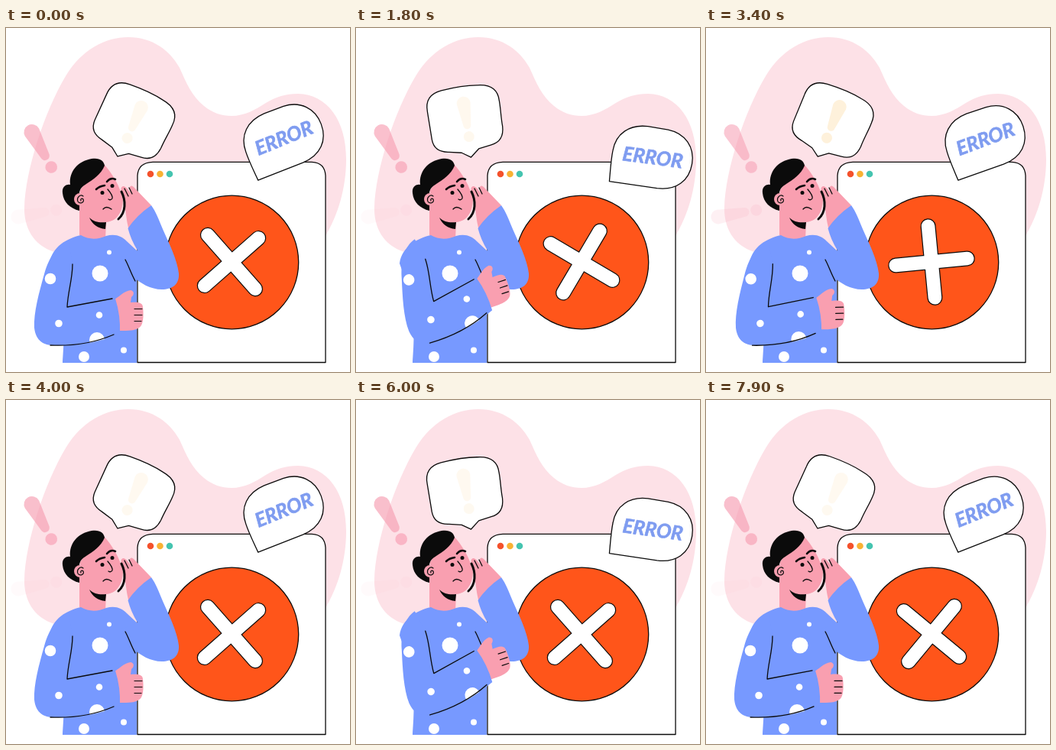
Recreate the animation shown at these times as an HTML page with a canvas. Size 450 by 450 pixels, loop 8000 ms.

```html
<!DOCTYPE html>
<html lang="en">
<head>
<meta charset="utf-8">
<title>Error</title>
<style>
html, body { margin: 0; width: 100%; height: 100%; overflow: hidden; background: #fff; }
canvas { display: block; width: 100vmin; height: 100vmin; margin: 0 auto; }
</style>
</head>
<body>
<canvas id="stage"></canvas>
<script>
const SIZE = 450;
const canvas = document.getElementById('stage');
const ctx = canvas.getContext('2d');
const ratio = Math.max(1, window.devicePixelRatio || 1);
canvas.width = canvas.height = SIZE * ratio;

const INK = '#0b0b0b', BLUE = '#7799ff', SKIN = '#f99fb0', BLUSH = '#fde1e7';
const ROSE = '#f7a0b4', AMBER = '#f9c46b', ORANGE = '#ff551a';

const shapes = Object.fromEntries(Object.entries({
  blob: 'M24 236C25 186 51 108 78 63C99 28 130 12 160 12C192 12 215 30 227 52C236 72 243 89 259 102C270 111 282 115 295 115C312 115 326 107 340 98C353 90 366 86 382 86C420 87 445 120 445 172C445 210 434 245 418 272L300 320H130C90 297 70 296 58 291C36 282 24 262 24 236Z',
  panel: 'M172 437.5V193Q173 176 192 175.3H400Q417 176 418 193V437.5Z',
  talk: 'M104 100C104 84 112 77 127 76C143 75 160 75 175 78C191 80 200 88 199 103C199 114 197 125 197 137C196 150 190 157 178 158L161 160L149 169L138 161L122 157C109 155 103 148 103 137Z',
  label: 'M331 200C330 186 328.5 172 329 160C329 137 345 122 369 121H396C419 122 434 138 434 160C434 183 419 198 394 199Z',
  torso: 'M74 438C75 420 78 390 72 350L57 308C60 286 80 275 98 271C108 277 120 277 131 272C143 269 151 272 158 279L172 292L171 330V438Z',
  sleeve: 'M159.5 262Q171 245 190 232C196 240 200 251 205 263C213 281 224 303 226 321C227 336 217 342 204 342C189 342 176 334 166 325L150 300L172 291C166 281 162 272 159.5 262Z',
  crease: 'M156 303C160 310 163 320 169 331',
  arm: 'M82 280C67 284 56 300 50 322C43 347 36 372 37 392C39 410 50 415 62 415C90 416 120 412 149 400Q150 376 143 354L80 365L87 309Z',
  armIn: 'M87 309C87 329 81 344 80 365Q112 359 139 354',
  armOut: 'M58 415Q104 417 141 401',
  hand: 'M139 357C148 352 154 344 163 343C168 344 168 349 164 352L163 359C172 358 179 359 179 365C180 373 180 384 177 389C172 397 158 396 146 396Z',
  knuckles: 'M168 367.5H178M168 375.5H178M168 383.5H177',
  face: 'M97 212C105 200 118 190 127 177C139 190 150 208 153 225C152 244 143 253 131 254L130 277C118 281 104 278 96 271V234Z',
  hair: 'M84 205C82 188 94 174 112 171C122 169.5 128 173 129 180C124 192 114 198 105 204C100 207 97 210 96 215V239C84 236 75 228 74 216C73 208 78 204 84 205Z',
  shade: 'M109 248C115 254 123 255 131 254L130 263C120 262 113 257 109 248Z',
  jaw: 'M151 214C157 226 157 241 147 250',
  ear: 'M101 220C97 217 92 222 94 227C97 231 103 228 101 224C99 222 97 224 98 226',
  palm: 'M161 264C157 252 157 238 154 225C150 215 149 208 153 207C156 206 160 212 163 215C160 208 163 204 167 208L190 232Z',
  fingers: 'M155 210L160 220M161 209L165 217',
  brows: 'M118 211Q122 207 129 206M132 201Q137 195 143 198',
  nose: 'M133 211Q140 219 139 223Q137 226 134 224',
  mouth: 'M127 237Q131 232 138 237'
}).map(([name, d]) => [name, new Path2D(d)]));

function fill(shape, color) {
  ctx.fillStyle = color;
  ctx.fill(shape);
}

function line(shape, width = 1.3, color = INK) {
  ctx.strokeStyle = color;
  ctx.lineWidth = width;
  ctx.stroke(shape);
}

function dot(x, y, r, color = '#fff') {
  ctx.fillStyle = color;
  ctx.beginPath();
  ctx.arc(x, y, r, 0, 7);
  ctx.fill();
}

function turned(x, y, degrees, draw) {
  ctx.save();
  ctx.translate(x, y);
  ctx.rotate(degrees * Math.PI / 180);
  ctx.translate(-x, -y);
  draw();
  ctx.restore();
}

// Cubic curve (.25, .1, .25, 1), solved by bisection.
function ease(x) {
  let lo = 0, hi = 1, s = 0.5;
  for (let i = 0; i < 22; i++) {
    s = (lo + hi) / 2;
    if (0.75 * s * (1 - s) + s * s * s < x) lo = s; else hi = s;
  }
  return 0.3 * s * (1 - s) ** 2 + 3 * s * s * (1 - s) + s ** 3;
}

// Goes 0 to 1 and back within one period, easing each way.
function swing(t, period) {
  const p = ((t / period) % 1 + 1) % 1 * 2;
  return p < 1 ? ease(p) : 1 - ease(p - 1);
}

const mix = (a, b, k) => a + (b - a) * k;

// Tapered bar with round ends, plus its dot, pointing down before rotation.
function mark(x, y, degrees, len, wide, thin, gap, r, color, alpha) {
  ctx.save();
  ctx.globalAlpha = alpha;
  ctx.translate(x, y);
  ctx.rotate(degrees * Math.PI / 180);
  ctx.fillStyle = color;
  ctx.beginPath();
  ctx.arc(0, 0, wide, Math.PI, 0);
  ctx.arc(0, len, thin, 0, Math.PI);
  ctx.closePath();
  ctx.fill();
  dot(0, len + gap, r, color);
  ctx.restore();
}

function drawPanel(t) {
  fill(shapes.panel, '#fff');
  line(shapes.panel);
  dot(189, 191, 4.3, '#f4512c');
  dot(201.5, 191, 4.3, '#f9b233');
  dot(214, 191, 4.3, '#45c4b0');
  dot(295.4, 306.5, 87.3, ORANGE);
  ctx.lineWidth = 1.3;
  ctx.strokeStyle = INK;
  ctx.stroke();

  turned(295, 306, 48.5 + t * 0.09, () => {
    const cross = new Path2D('M248 306H342M295 259V353');
    line(cross, 20);
    line(cross, 17.6, '#fff');
  });
}

function drawBubbles(k, glow) {
  turned(150, 161, mix(23, -11, k), () => {
    fill(shapes.talk, '#fff');
    line(shapes.talk);
    mark(152.5, 98, 1.5, 29, 9, 5, 15, 7, AMBER, mix(0.1, 0.5, glow));
  });
  turned(328, 203, mix(-20.5, 9.5, k), () => {
    fill(shapes.label, '#fff');
    line(shapes.label);
    ctx.translate(382, 160);
    ctx.rotate(-0.03);
    ctx.font = 'italic bold 25.7px Lato, "Open Sans", sans-serif';
    ctx.textAlign = 'center';
    ctx.fillStyle = ctx.strokeStyle = '#7f9cf0';
    ctx.lineWidth = 0.7;
    ctx.fillText('ERROR', 0, 9);
    ctx.strokeText('ERROR', 0, 9);
  });
}

function drawHead() {
  fill(shapes.face, SKIN);
  fill(shapes.shade, INK);
  fill(shapes.hair, INK);
  dot(97, 224, 8, SKIN);
  line(shapes.ear, 1.2);
  dot(126, 215.5, 2.5, INK);
  dot(139, 206.5, 2.5, INK);
  line(shapes.brows, 2.6);
  line(shapes.nose);
  line(shapes.mouth);
  fill(shapes.palm, SKIN);
  line(shapes.jaw, 3);
  line(shapes.fingers);
}

function drawArm() {
  fill(shapes.hand, SKIN);
  line(shapes.knuckles, 1.2);
  fill(shapes.arm, BLUE);
  ctx.save();
  ctx.clip(shapes.arm);
  dot(58, 328, 7.3);
  dot(69, 386.5, 4.8);
  dot(122, 375.5, 4.3);
  dot(119, 408, 10);
  ctx.restore();
  line(shapes.armIn);
  line(shapes.armOut);
}

function drawMan(k) {
  drawHead();
  fill(shapes.torso, BLUE);
  fill(shapes.sleeve, BLUE);
  line(shapes.crease);
  dot(102, 430, 7);
  dot(154, 421.5, 4);
  turned(68, 294, mix(0, -18.4, k), drawArm);
  dot(123, 321, 10.5);
  dot(135, 293.5, 3);
}

function draw(t) {
  const k = swing(t - 25, 4000);
  const glow = swing(t - 25, 2000);
  ctx.setTransform(ratio, 0, 0, ratio, 0, 0);
  ctx.fillStyle = '#fff';
  ctx.fillRect(0, 0, SIZE, SIZE);
  ctx.lineCap = ctx.lineJoin = 'round';
  fill(shapes.blob, BLUSH);
  mark(34, 136.5, -29, 35, 10.5, 6, 17, 7.8, ROSE, mix(0.67, 0.4, glow));
  mark(16, 247, -100, 35, 9.5, 6, 15.5, 7.5, ROSE, mix(0.05, 0.36, glow));
  drawPanel(t);
  drawBubbles(k, glow);
  drawMan(k);
}

const start = performance.now();
function tick() {
  draw((performance.now() - start) % 8000);
  requestAnimationFrame(tick);
}
tick();
</script>
</body>
</html>
```
